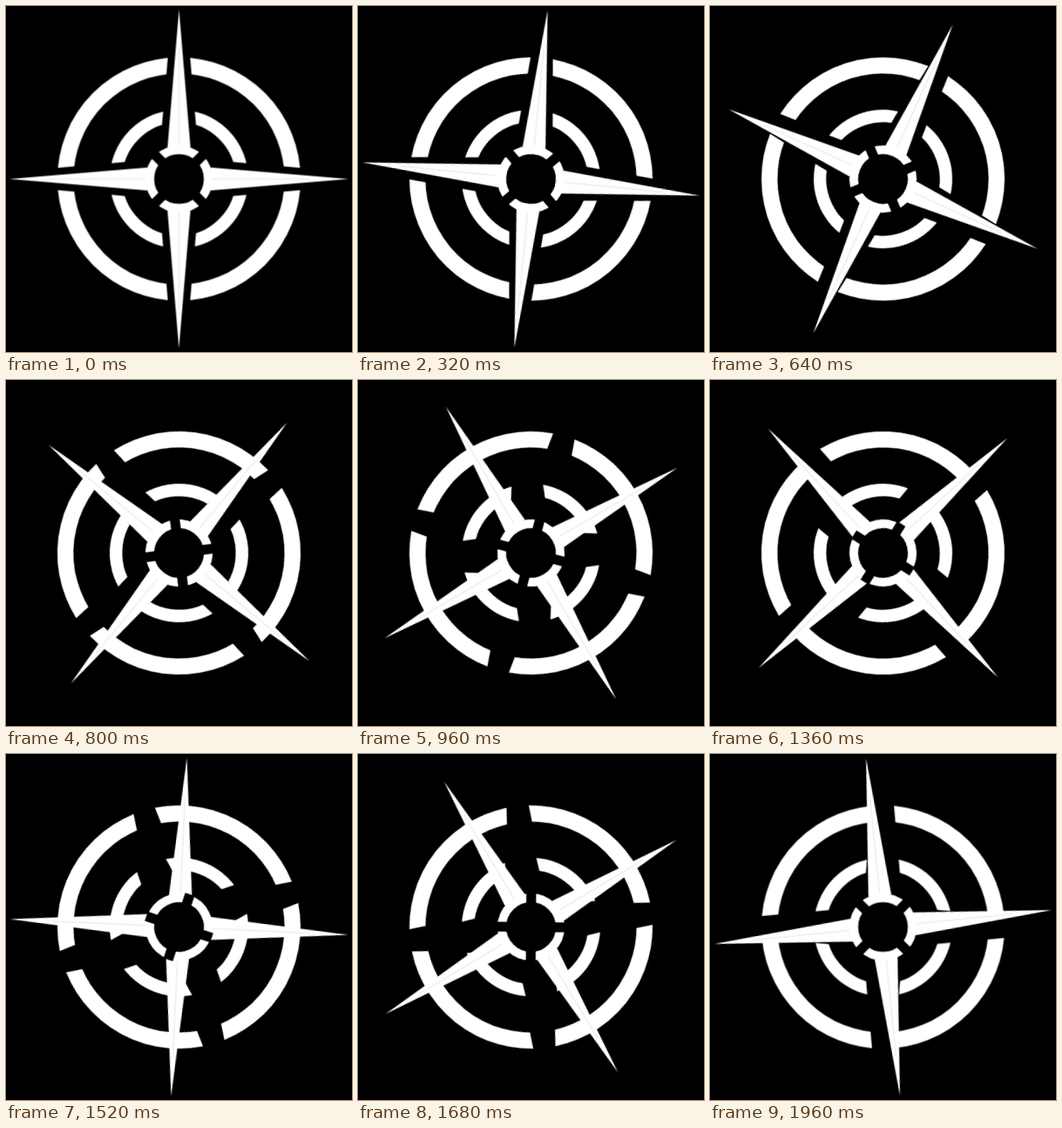
An HTML page that plays this animation: 397 by 397 pixels, repeating every 2000 ms.

```html
<!DOCTYPE html>
<html lang="en">
<head>
<meta charset="utf-8">
<title>Compass</title>
<style>
  html, body { margin: 0; width: 100%; height: 100%; overflow: hidden; background: #000; }
  svg { display: block; width: 100%; height: 100%; }
  circle { fill: none; stroke: #fff; }
  .needle { fill: #fff; }
  .seam { stroke: #bbb; stroke-width: .4; }

  .spin { transform-origin: 0 0; animation: turn 2s infinite; }
  .outer { animation-timing-function: cubic-bezier(.86, 0, .215, 1); }
  .inner { animation-timing-function: cubic-bezier(.855, 0, .325, 1); }
  .hub { animation-timing-function: cubic-bezier(.85, 0, .67, 1); }
  .star { animation-timing-function: cubic-bezier(.765, 0, .917, 1); }
  @keyframes turn {
    from { transform: rotate(0deg); }
    to { transform: rotate(360deg); }
  }
</style>
</head>
<body>
<svg viewBox="0 0 397 397">
  <g transform="translate(198.5 198.5)">
    <g class="spin outer">
      <circle r="130.3" stroke-width="18.4"/>
      <path class="quad" d="M-12.3-145H12.3L14.9-115H-14.9Z"/>
    </g>
    <g class="spin inner">
      <circle r="72.3" stroke-width="14.4"/>
      <path class="quad" d="M-17.6-84H17.6L19.7-60H-19.7Z"/>
    </g>
    <g class="spin star">
      <g class="quad">
        <path class="needle" d="M0-194.5L13.2-36H-13.2Z"/>
        <path class="seam" d="M0-150V-38"/>
      </g>
    </g>
    <g class="spin hub">
      <circle r="33.5" stroke-width="10"/>
      <path class="quad" d="M-5.6-39.5H5.6V-25H-5.6Z" transform="rotate(45)"/>
    </g>
  </g>
</svg>
<script>
  const STEP = 40, LOOP = 2000;

  // Repeat each marked shape at the other three quarter turns.
  for (const shape of document.querySelectorAll('.quad')) {
    const base = shape.getAttribute('transform') || '';
    for (const deg of [90, 180, 270]) {
      const copy = shape.cloneNode(true);
      copy.setAttribute('transform', `rotate(${deg}) ${base}`);
      shape.after(copy);
    }
  }

  // Advance the CSS spins at 25 frames per second.
  const spins = document.getAnimations();
  spins.forEach(spin => spin.pause());
  const start = performance.now();

  function tick() {
    const elapsed = performance.now() - start;
    const time = Math.floor((elapsed + 2) / STEP) * STEP % LOOP;
    for (const spin of spins) spin.currentTime = time;
    requestAnimationFrame(tick);
  }
  tick();
</script>
</body>
</html>
```
